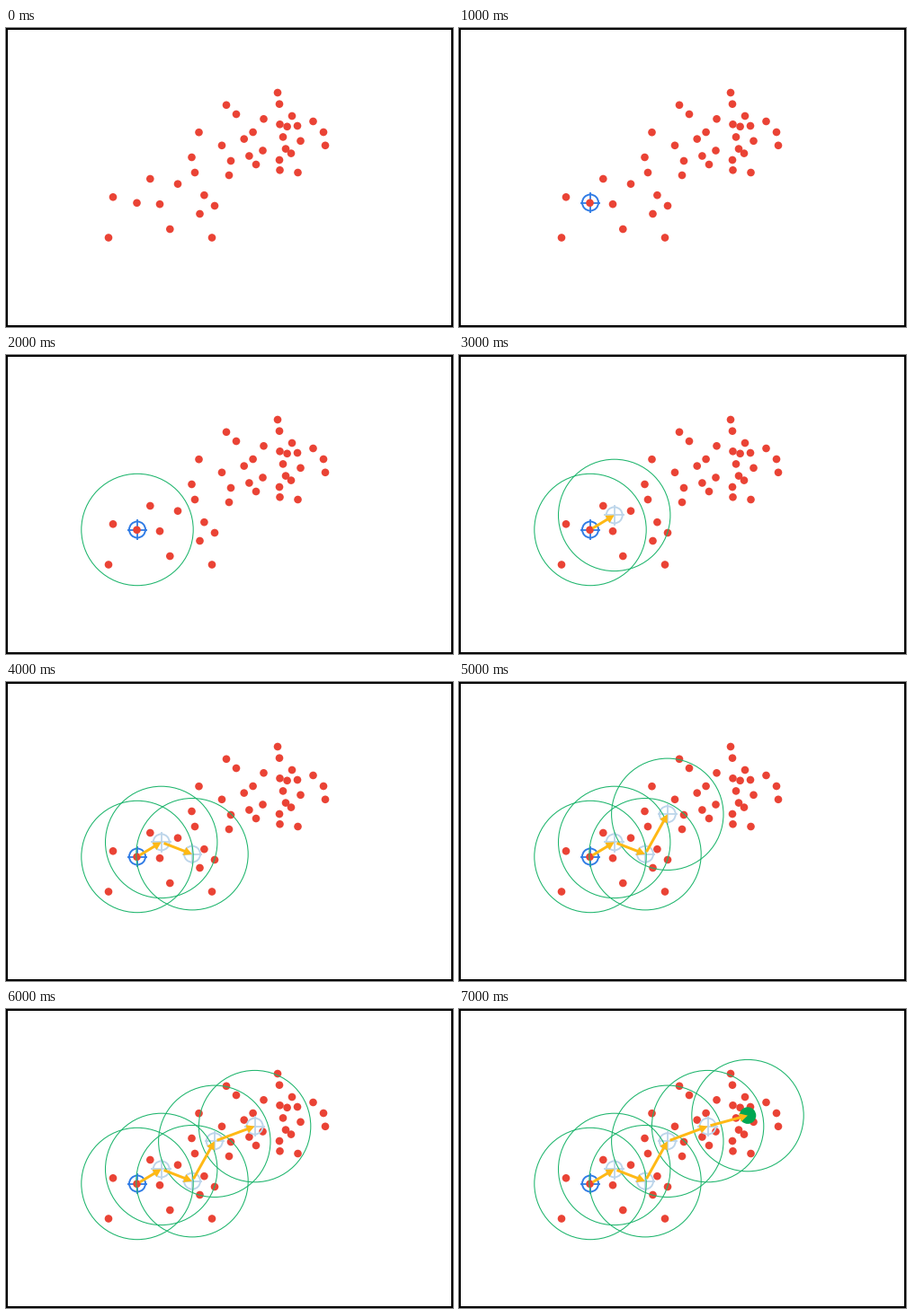
Recreate the animation shown at these times as a matplotlib script. Size 497 px wide and 333 px high, loop 8000 ms.

```python
import matplotlib.pyplot as plt
import numpy as np
from matplotlib.animation import FuncAnimation
from matplotlib.patches import Circle, Polygon, Rectangle

W, H, DPI = 497, 333, 100
PX = 72 / DPI  # points per pixel

RED, GREEN, RING = "#ea4335", "#00a651", "#1db56c"
BLUE, PALE, AMBER = "#2f7be5", "#bcd5ea", "#ffb915"

DOTS = [
    (302, 72), (304, 84.7), (245, 85.8), (256, 96), (318, 98), (286.5, 101.3),
    (341.5, 104), (304.5, 107.3), (312.6, 109.8), (324, 109), (353, 116),
    (274.6, 116), (214.5, 116.2), (308, 121.4), (264.7, 123.6), (327.5, 125.8),
    (240, 130.8), (355, 130.8), (311, 134.6), (285.5, 136.5), (317, 139.6),
    (270.4, 142.5), (206.5, 144), (304, 147), (250, 148), (278, 152),
    (304.5, 158.3), (324.5, 161), (210, 161), (248, 164), (160.3, 168),
    (191, 173.7), (220.4, 186.2), (119, 188.3), (145.5, 194.8), (171, 196.2),
    (232, 198), (215.5, 207), (182.3, 224), (114, 233.5), (229, 233.5),
]
START = (146, 194.5)
PATH = [START, (172.7, 178.4), (207, 191.7), (231.8, 147.3),
        (276.6, 130.6), (321, 118.6)]
RADIUS = 62.2
STEPS = 8

fig = plt.figure(figsize=(W / DPI, H / DPI), dpi=DPI, facecolor="white")
ax = fig.add_axes([0, 0, 1, 1])
ax.set_xlim(0, W)
ax.set_ylim(H, 0)
ax.axis("off")

stages = [[] for _ in range(STEPS)]  # artists that appear at each step


def disc(xy, r, color, z, step=0):
    stages[step].append(ax.add_patch(Circle(xy, r, fc=color, ec="none", zorder=z)))


def window(xy, step):
    stages[step].append(ax.add_patch(
        Circle(xy, RADIUS, fill=False, ec=RING, lw=1.05 * PX, zorder=5)))


def target(xy, color, z, step):
    x, y = xy
    stages[step].append(ax.add_patch(
        Circle(xy, 9, fill=False, ec=color, lw=1.9 * PX, zorder=z)))
    for dx, dy in ((11.3, 0), (0, 11.3)):
        stages[step] += ax.plot([x - dx, x + dx], [y - dy, y + dy], color=color,
                                lw=1.8 * PX, solid_capstyle="butt", zorder=z)


def arrow(a, b, step):
    a, b = np.array(a), np.array(b)
    u = (b - a) / np.hypot(*(b - a))
    n = np.array([-u[1], u[0]])
    tail, neck = a + 3 * u, b - 9 * u
    shaft = ax.plot(*zip(tail, neck + u), color=AMBER, lw=3 * PX,
                    solid_capstyle="butt", zorder=8)
    head = Polygon([b, neck + 4.8 * n, neck - 4.8 * n], fc=AMBER, ec="none", zorder=8)
    stages[step] += shaft + [ax.add_patch(head)]


for left, top, w, h in ((0, 0, W, 2), (0, H - 2, W, 2), (0, 0, 2, H), (W - 2, 0, 2, H)):
    ax.add_patch(Rectangle((left, top), w, h, fc="black", ec="none",
                           antialiased=False, zorder=10))

for dot in DOTS:
    disc(dot, 4.3, RED, 3)

target(START, BLUE, 2, 1)
window(START, 2)
for i in range(1, len(PATH)):
    step = i + 2
    window(PATH[i], step)
    arrow(PATH[i - 1], PATH[i], step)
    if i < len(PATH) - 1:
        target(PATH[i], PALE, 4, step)
disc(PATH[-1], 9.3, GREEN, 6, STEPS - 1)


def draw(k):
    for step, artists in enumerate(stages):
        for artist in artists:
            artist.set_visible(step <= k)
    return []


anim = FuncAnimation(fig, draw, frames=STEPS, init_func=lambda: draw(0),
                     interval=1000, repeat=True, repeat_delay=0, blit=False)
plt.show()
```
